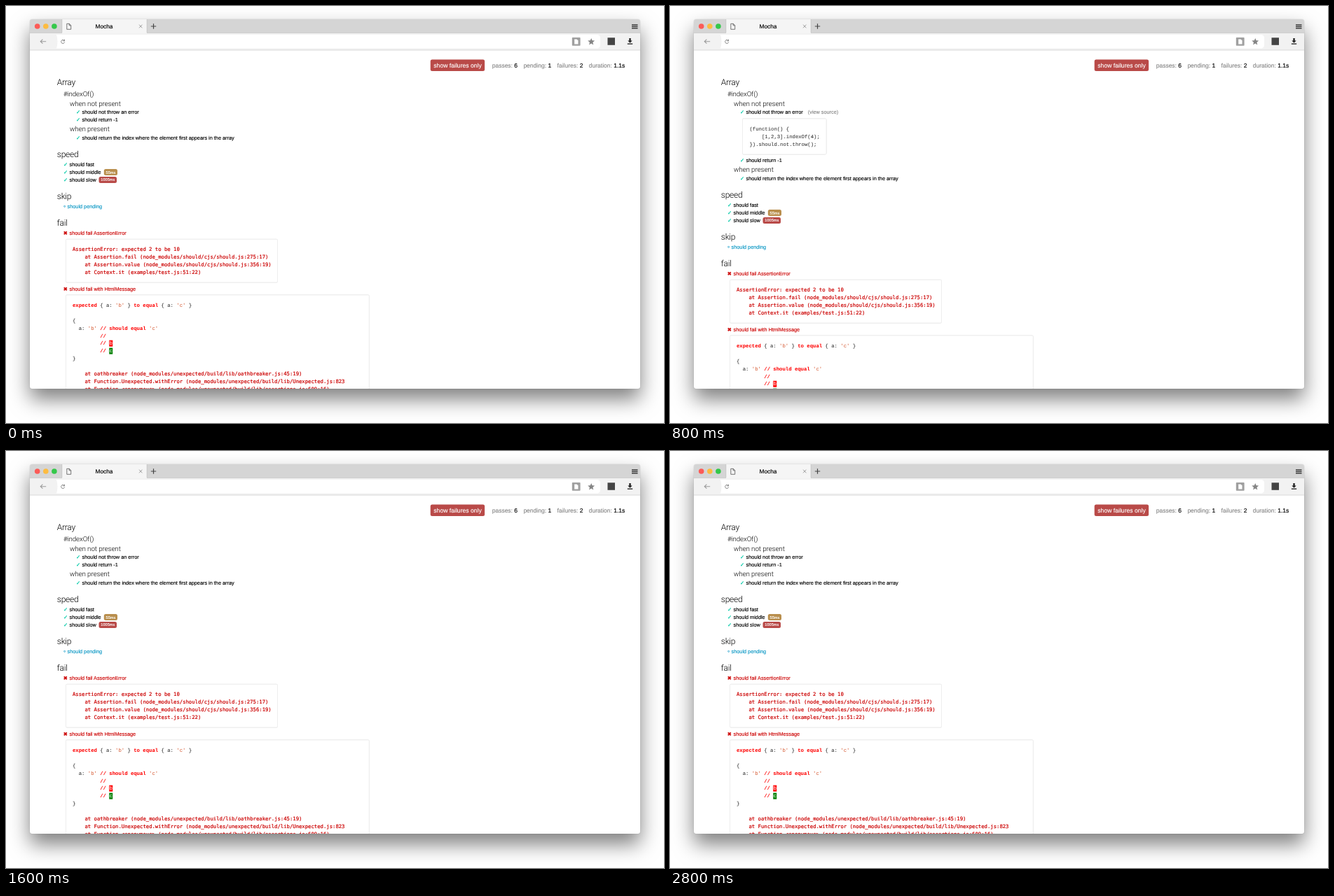
These frames come from a looping animation (939x596 px, 3200 ms). An HTML page:

```html
<!DOCTYPE html>
<html lang="en">
<head>
<meta charset="utf-8">
<title>Mocha</title>
<style>
  html, body { margin: 0; width: 100%; height: 100%; overflow: hidden; background: #fff; }
  .window {
    position: absolute; left: 34px; top: 19px; width: 871px; height: 528px; border-radius: 4px 4px 3px 3px;
    background: #fff; box-shadow: 0 15px 29px rgba(0, 0, 0, .5), 0 0 1px rgba(0, 0, 0, .4);
  }
  svg { position: absolute; left: 0; top: 0; }
  text {
    font: 7.3px "Liberation Sans", Arial, sans-serif; white-space: pre; text-rendering: geometricPrecision;
    fill: var(--ink, #000); stroke: var(--ink, #000); stroke-width: .15px;
  }
  .h1, .h2, .h3 { font-family: Roboto, "Liberation Sans", sans-serif; font-weight: 300; stroke: none; }
  .h1 { font-size: 12.1px; letter-spacing: -.3px; }
  .h2 { font-size: 9.7px; letter-spacing: -.1px; }
  .h3 { font-size: 9.8px; letter-spacing: -.1px; }
  .mark { font-family: "DejaVu Sans", sans-serif; stroke-width: .25px; }
  .tab { font-size: 8.3px; }
  .button { font-size: 8.65px; }
  .stat { font-size: 8.5px; --ink: #888; }
  .stat tspan { fill: #000; stroke: #000; }
  .badge { font-size: 5.6px; --ink: #fff; text-anchor: middle; }
  .stack { font: 7.26px "DejaVu Sans Mono", monospace; --ink: #c00; stroke-width: .2px; }
  .code, .chip { font: 7.28px "Liberation Mono", monospace; --ink: #333; stroke-width: .06px; }
  .chip { --ink: #fff; }
  .bold { font-weight: bold; fill: #f00; stroke: #f00; }
  .str { fill: #d4552c; stroke: none; }
  .box { fill: #fff; stroke: #eee; filter: drop-shadow(0 .7px .7px rgba(0, 0, 0, .12)); }
</style>
</head>
<body>
<div class="window"></div>
<svg id="stage" width="939" height="596" viewBox="0 0 939 596"></svg>
<script>
const LOOP = 3200, PITCH = 10.9, CHAR = 4.37;

const text = (x, y, body, cls = '', ink = '') =>
  `<text x="${x}" y="${y}" class="${cls}"${ink && ` style="--ink:${ink}"`}>${body}</text>`;
const rect = (x, y, w, h, fill, r = 0) =>
  `<rect x="${x}" y="${y}" width="${w}" height="${h}" rx="${r}" fill="${fill}"/>`;
const line = (d, color, width = 1) =>
  `<path d="${d}" fill="none" stroke="${color}" stroke-width="${width}"/>`;
const shape = (d, fill) => `<path d="${d}" fill="${fill}"/>`;
const box = (x, y, w, h) =>
  `<rect class="box" x="${x}" y="${y}" width="${w}" height="${h}" rx="1.5"/>`;
const group = (id, body) => `<g id="${id}">${body}</g>`;
const lines = (x, y, cls, rows) =>
  rows.map((row, i) => text(x, y + i * PITCH, row, cls)).join('');

const pass = (x, y, label) => text(x, y, '✓', 'mark', '#00c9a7') + text(x + 8.6, y, label);
const fail = (y, label) => text(81.7, y, '✖', 'mark', '#c00') + text(90.6, y, label, '', '#c00');
const badge = (x, y, w, label, color) =>
  rect(x, y, w, 9, color, 2.5) + text(x + w / 2, y + 6.5, label, 'badge');
const stat = (x, label, value) => text(x, 87.8, `${label}: <tspan>${value}</tspan>`, 'stat');
const bold = s => `<tspan class="bold">${s}</tspan>`;
const str = s => `<tspan class="str">'${s}'</tspan>`;

function chrome() {
  const lights = ['#fc5b57', '#fdbc40', '#34c84a']
    .map((c, i) => `<circle cx="${44.7 + i * 12.1}" cy="29" r="3.8" fill="${c}"/>`).join('');
  const menu = [26.3, 28.7, 31.1].map(y => rect(893, y, 8.5, 1.4, '#333')).join('');
  const bars = shape('M34 39V23q0-4 4-4H901q4 0 4 4V39z', '#d5d5d5') +
    rect(34, 38.5, 871, 24.5, '#f2f2f2') + rect(34, 38, 871, .6, '#c4c4c4') +
    rect(34, 62.6, 871, .8, '#cfcfcf');
  const tab = rect(80, 19, 121, 20, '#f5f5f5') +
    rect(79.6, 19, .6, 19, '#bbb') + rect(200.8, 19, .6, 19, '#bbb') +
    line('M86.8 25.3h3.6l2.3 2.4v5.6h-5.9zM90.2 25.3v2.6h2.5', '#555', .8) +
    text(127.5, 32, 'Mocha', 'tab') +
    line('M190 26.7l4.4 4.6m0-4.6l-4.4 4.6', '#888', .8) +
    line('M206.8 29h7.4M210.5 25.3v7.4', '#444', 1.2);
  const address = shape('M72 41H843q5 0 5 5v9.5q0 5-5 5H72q3-10 0-19.5z', '#fff') +
    line('M57.2 50.7h-8m3.2-3l-3.2 3l3.2 3', '#999', 1.1) +
    line('M83 49.3a2.5 2.5 0 1 0 .6 2.2M83.5 47.8v2.1h-2.1', '#777', .9);
  const tools = rect(807.8, 45, 11.8, 11.8, '#a0a0a0', .8) +
    shape('M811.2 47.5h3.3l2 2v5h-5.3z', '#fff') +
    shape('M835.2 46l1.4 3.3 3.5.3-2.7 2.3.9 3.5-3.1-1.9-3.1 1.9.9-3.5-2.7-2.3 3.5-.3z', '#858585') +
    rect(858.5, 45.3, 10.5, 10.5, '#444') +
    shape('M889.3 46h2.4v3.5h2l-3.2 3.2-3.2-3.2h2z', '#222') + rect(886.8, 53.5, 7.4, 1.3, '#222');
  return bars + tab + lights + menu + address + tools;
}

function stats() {
  return rect(605.7, 76.6, 77.4, 16.4, '#b94a48', 2.5) +
    text(610.3, 87.9, 'show failures only', 'button', '#fff') +
    stat(693.7, 'passes', 6) + stat(738.4, 'pending', 1) +
    stat(786.6, 'failures', 2) + stat(831.8, 'duration', '1.1s');
}

function passing() {
  const source = box(103.5, 161, 119.5, 51) + lines(113.5, 177.8, 'code', [
    '(function() {', '    [1,2,3].indexOf(4);', '}).should.not.throw();']);
  const rest =
    pass(100, 165.2, 'should return -1') +
    text(91, 179.2, 'when present', 'h3') +
    pass(100, 190.5, 'should return the index where the element first appears in the array') +
    text(72.8, 216.2, 'speed', 'h1') +
    pass(82, 228.7, 'should fast') +
    pass(82, 239.6, 'should middle') + badge(139.8, 233, 19.2, '55ms', '#b98f4e') +
    pass(82, 250.5, 'should slow') + badge(132.5, 243.9, 25.5, '1005ms', '#b94a48') +
    text(72.8, 276.2, 'skip', 'h1') +
    text(81.5, 288.7, '◦', 'mark', '#0b97c4') + text(87.6, 288.7, 'should pending', '', '#0b97c4');
  return text(72.8, 112.6, 'Array', 'h1') +
    text(82, 128.6, '#indexOf()', 'h2') +
    text(91, 143.1, 'when not present', 'h3') +
    pass(100, 154.4, 'should not throw an error') +
    group('link', text(196.8, 154.4, '(view source)', '', '#888')) +
    group('source', source) + group('rest', rest);
}

function failing() {
  const lib = 'node_modules/unexpected/build/lib/';
  const top = 429.9, indent = 95 + 4 * CHAR;
  const chip = (row, color, letter) => {
    const x = 95 + 12 * CHAR, y = top + row * PITCH;
    return rect(x - .2, y - 6.7, 5, 9, color) + text(x, y, letter, 'chip');
  };
  const message = [
    `${bold('expected')} { a: ${str('b')} } ${bold('to equal')} { a: ${str('c')} }`,
    '', '{',
    `  a: ${str('b')} ${bold('// should equal')} ${str('c')}`,
    ...Array(3).fill(' '.repeat(9) + bold('//')),
    '}'];
  const trace = [
    `oathbreaker (${lib}oathbreaker.js:45:19)`,
    `Function.Unexpected.withError (${lib}Unexpected.js:823:17)`,
    `Function.&lt;anonymous&gt; (${lib}assertions.js:609:16)`,
    `executeExpect (${lib}Unexpected.js:1186:81)`,
    `Unexpected.expect [as _expect] (${lib}Unexpected.js:1194:22)`,
    `expect (${lib}Unexpected.js:834:27)`,
    'Context.it (examples/test.js:55:9)'].map(s => 'at ' + s);
  return text(72.8, 314.2, 'fail', 'h1') +
    fail(326.8, 'should fail AssertionError') + box(85.5, 333.3, 302, 61.7) +
    text(95, 350.4, 'AssertionError: expected 2 to be 10', 'stack') +
    lines(indent, 350.4 + PITCH, 'stack', [
      'at Assertion.fail (node_modules/should/cjs/should.js:275:17)',
      'at Assertion.value (node_modules/should/cjs/should.js:356:19)',
      'at Context.it (examples/test.js:51:22)']) +
    fail(406.7, 'should fail with HtmlMessage') + box(85.5, 413, 432.7, 193) +
    lines(95, top, 'code', message) + chip(5, '#f00', 'b') + chip(6, '#008000', 'c') +
    `<g clip-path="url(#pre)">${lines(indent, top + 9 * PITCH - .2, 'stack', trace)}</g>`;
}

document.getElementById('stage').innerHTML =
  `<clipPath id="page"><path d="M34 63.4H905V544q0 3-3 3H37q-3 0-3-3z"/></clipPath>
   <clipPath id="pre"><rect x="95" y="415" width="389" height="190"/></clipPath>` +
  chrome() +
  `<g clip-path="url(#page)">${stats() + group('passing', passing()) + group('failing', failing())}</g>`;

// Each step is [start in ms, value]; a value holds until the next step.
function hold(id, prop, steps) {
  const frames = steps.map(([t, value]) => ({ offset: t / LOOP, [prop]: value, easing: 'steps(1, end)' }));
  frames.push({ offset: 1, [prop]: steps[steps.length - 1][1] });
  document.getElementById(id).animate(frames, { duration: LOOP, iterations: Infinity });
}
const shift = y => `translate(0px, ${y}px)`;

hold('link', 'opacity', [[0, 0], [400, 1], [1600, 0]]);
hold('source', 'opacity', [[0, 0], [800, 1], [1200, 0]]);
hold('rest', 'transform', [[0, shift(0)], [800, shift(58)], [1200, shift(0)]]);
hold('passing', 'opacity', [[0, 1], [2000, 0], [2800, 1]]);
hold('failing', 'transform', [[0, shift(0)], [800, shift(58)], [1200, shift(0)], [2000, shift(-201.6)], [2800, shift(0)]]);
</script>
</body>
</html>
```
